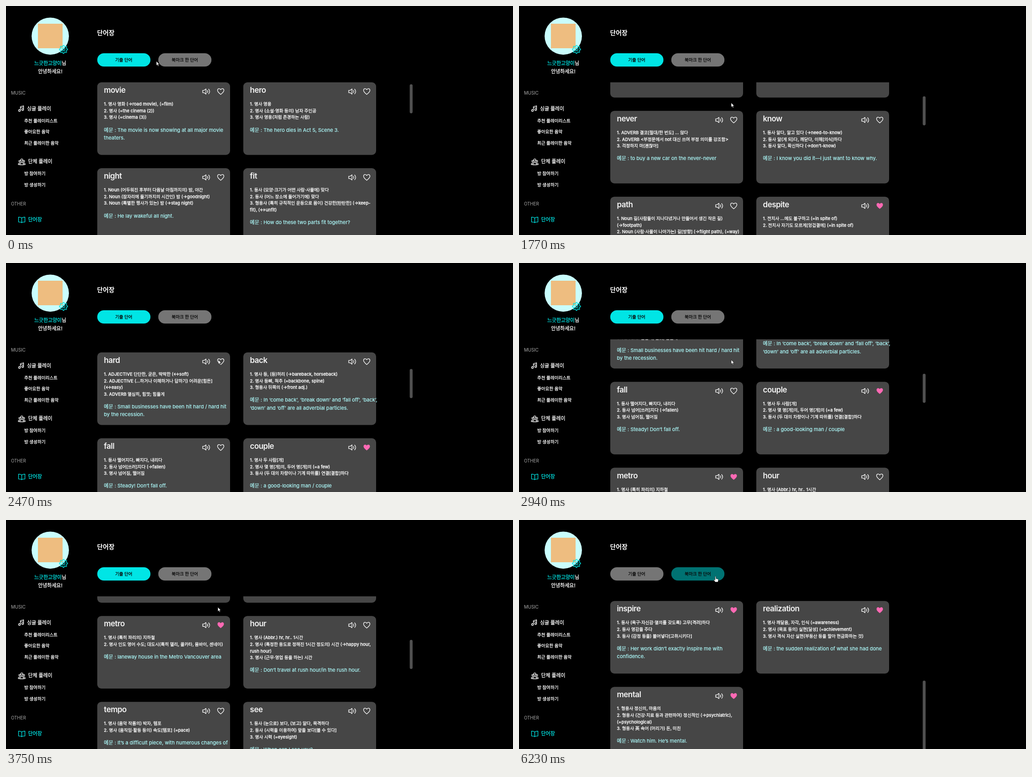
Recreate the animation shown at these times as an HTML page. Size 1111 by 504 pixels, loop 6.69 s.

```html
<!DOCTYPE html>
<html lang="ko">
<head>
<meta charset="utf-8">
<title>단어장</title>
<style>
html, body { margin: 0; width: 100%; height: 100%; overflow: hidden; background: #000; }
svg { display: block; width: 100%; height: 100%; }
/* The thin outline gives both scripts the same medium weight. */
text { font: 500 9.55px Inter, "Noto Sans CJK KR", sans-serif; fill: #fff; stroke: #fff; stroke-width: .28; }
.name { font-size: 10.9px; }
.section { font-size: 9.7px; font-weight: 400; fill: #a9a9a9; stroke: none; }
.heading { font-size: 13.8px; font-weight: 700; stroke: none; }
.word { font-size: 17px; font-weight: 600; letter-spacing: -.55px; fill: #f4f4f4; stroke: none; }
.example { font-size: 11px; font-weight: 400; fill: #b0ffff; stroke: #b0ffff; stroke-width: .2; }
.tab { fill: #0a0a0a; stroke: #0a0a0a; text-anchor: middle; }
.line { fill: none; stroke: #fff; stroke-width: 1.3; stroke-linecap: round; stroke-linejoin: round; }
.cyan { fill: #00e5e5; stroke: #00e5e5; }
.line.cyan { fill: none; }
</style>
</head>
<body>
<svg viewBox="0 0 1111 504">
  <defs>
    <clipPath id="view"><rect x="200" y="168" width="700" height="336"/></clipPath>
    <path id="heart" d="M0 6.5C-3 4-7 1-7-2.4C-7-4.9-5.4-6.3-3.6-6.3C-2-6.3-.7-5.4 0-4C.7-5.4 2-6.3 3.6-6.3C5.4-6.3 7-4.9 7-2.4C7 1 3 4 0 6.5Z"/>
    <path id="speaker" d="M-8-2.6H-4.8L-.8-5.8V5.8L-4.8 2.6H-8ZM2.2-2.6Q4.2 0 2.2 2.6M5-5.2Q9.6 0 5 5.2"/>
  </defs>

  <circle cx="97" cy="66.3" r="40.9" fill="#c9fdfd"/>
  <rect x="70" y="39" width="54" height="54" fill="#eebd80"/>
  <path id="gear" class="line cyan"/>
  <circle class="line cyan" cx="126" cy="95.5" r="3"/>

  <g class="line">
    <path d="M31.5 230V221.5L38.5 219.5V228M31.5 224L38.5 222"/>
    <circle cx="29.5" cy="230" r="2"/><circle cx="36.5" cy="228" r="2"/>
    <circle cx="34.5" cy="339" r="2.4"/><circle cx="29.8" cy="341.5" r="1.7"/><circle cx="39.2" cy="341.5" r="1.7"/>
    <path d="M30.5 349.5Q30.5 344 34.5 344T38.5 349.5ZM30 345.3Q27 345.5 27 349H30M39 345.3Q42 345.5 42 349H39"/>
  </g>
  <path class="line cyan" d="M34.5 467Q33 464.7 27.5 464.7V475.3Q33 475.3 34.5 477Q36 475.3 41.5 475.3V464.7Q36 464.7 34.5 467V477"/>

  <text class="name" x="97" y="129.8" text-anchor="middle"><tspan class="cyan">느긋한고양이</tspan>님</text>
  <text class="name" x="97" y="147.6" text-anchor="middle">안녕하세요!</text>
  <text class="section" x="11" y="194.7">MUSIC</text>
  <text class="name" x="46" y="230">싱글 플레이</text>
  <text x="40" y="255.5">추천 플레이리스트</text>
  <text x="40" y="280.2">좋아요한 음악</text>
  <text x="40" y="305">최근 플레이한 음악</text>
  <text class="name" x="48.6" y="346.4">단체 플레이</text>
  <text x="40" y="372.1">방 참여하기</text>
  <text x="40" y="396.8">방 생성하기</text>
  <text class="section" x="11" y="439.4">OTHER</text>
  <text class="name cyan" x="48.6" y="474.4">단어장</text>

  <text class="heading" x="199.6" y="64">단어장</text>
  <rect id="tabAll" x="200" y="104" width="116.5" height="29.3" rx="14.65"/>
  <rect id="tabMarked" x="333.7" y="104" width="116.5" height="29.3" rx="14.65"/>
  <text class="tab" x="258" y="122">기출 단어</text>
  <text class="tab" x="392" y="122">북마크 한 단어</text>

  <g clip-path="url(#view)"><g id="all"></g><g id="marked"></g></g>
  <rect id="thumb" x="884.7" width="6.3" rx="3.1" fill="#505050"/>

  <circle id="click" cx="425.3" cy="118.7" r="9" fill="#ff0" opacity=".55"/>
  <g id="cursor" fill="#fff" stroke="#000" stroke-width=".6">
    <path id="arrow" d="M0 0V9.4L2.2 7.4L3.7 10.9L5.2 10.2L3.7 6.9H6.6Z"/>
    <path id="hand" d="M-1 .8Q0-.8 1 .8V5L5.2 6Q6.4 6.4 6.2 7.8L5.4 12.5H-.6L-3.8 8.2Q-4 6.6-2.6 7L-1 8.4Z"/>
  </g>
</svg>

<script>
const LOOP = 6690, PITCH = 189, TOP = 168, NOTCH = 181.8;
const $ = id => document.getElementById(id);

// [word, definition lines, example lines, bookmarked]
const allWords = [
  ['movie', ['1. 명사 영화 (→road movie), (=film)', '2. 명사 (=the cinema (2))', '3. 명사 (=cinema (3))'],
    ['The movie is now showing at all major movie', 'theaters.']],
  ['hero', ['1. 명사 영웅', '2. 명사 (소설·영화 등의) 남자 주인공', '3. 명사 영웅(처럼 존경하는 사람)'],
    ['The hero dies in Act 5, Scene 3.']],
  ['night', ['1. Noun (어두워진 후부터 다음날 아침까지의) 밤, 야간', '2. Noun (잠자리에 들기까지의 시간인) 밤 (→goodnight)', '3. Noun (특별한 행사가 있는) 밤 (→stag night)'],
    ['He lay wakeful all night.']],
  ['fit', ['1. 동사 (모양·크기가 어떤 사람·사물에) 맞다', '2. 동사 (어느 장소에 들어가기에) 맞다', '3. 형용사 (특히 규칙적인 운동으로 몸이) 건강한[탄탄한] (→keep-', 'fit), (↔unfit)'],
    ['How do these two parts fit together?']],
  ['never', ['1. ADVERB 결코[절대/한 번도] ... 않다', '2. ADVERB &lt;부정문에서 not 대신 쓰여 부정 의미를 강조함&gt;', '3. 걱정하지 마[괜찮아]'],
    ['to buy a new car on the never-never']],
  ['know', ['1. 동사 알다, 알고 있다 (→need-to-know)', '2. 동사 알(게 되)다, 깨닫다, 이해[의식]하다', '3. 동사 알다, 확신하다 (→don’t-know)'],
    ['I know you did it—I just want to know why.']],
  ['path', ['1. Noun 길(사람들이 지나다녔거나 만들어서 생긴 작은 길)', '(→footpath)', '2. Noun (사람·사물이 나아가는) 길[방향] (→flight path), (=way)', '3. Noun (행동) 계획, 길'],
    ['a concrete path']],
  ['despite', ['1. 전치사 …에도 불구하고 (=in spite of)', '2. 전치사 자기도 모르게[엉겁결에] (=in spite of)'],
    ['Her voice was shaky despite all her efforts', 'to control it.'], true],
  ['hard', ['1. ADJECTIVE 단단한, 굳은, 딱딱한 (↔soft)', '2. ADJECTIVE (…하거나 이해하거나 답하기) 어려운[힘든]', '(↔easy)', '3. ADVERB 열심히, 힘껏; 힘들게'],
    ['Small businesses have been hit hard / hard hit', 'by the recession.']],
  ['back', ['1. 명사 등, (등)허리 (→bareback, horseback)', '2. 명사 등뼈, 척추 (=backbone, spine)', '3. 형용사 뒤쪽의 (→front adj.)'],
    ['In ‘come back’, ‘break down’ and ‘fall off’, ‘back’,', '‘down’ and ‘off’ are all adverbial particles.']],
  ['fall', ['1. 동사 떨어지다, 빠지다, 내리다', '2. 동사 넘어[쓰러]지다 (→fallen)', '3. 명사 넘어짐, 떨어짐'],
    ['Steady! Don’t fall off.']],
  ['couple', ['1. 명사 두 사람[개]', '2. 명사 몇 명[개]의, 두어 명[개]의 (=a few)', '3. 동사 (두 대의 차량이나 기계 따위를) 연결[결합]하다'],
    ['a good-looking man / couple'], true],
  ['metro', ['1. 명사 (특히 파리의) 지하철', '2. 명사 인도 영어 수도; 대도시(특히 델리, 콜카타, 뭄바이, 센네이)'],
    ['laneway house in the Metro Vancouver area'], true],
  ['hour', ['1. 명사 (Abbr.) hr, hr.. 1시간', '2. 명사 (특정한 용도로 정해진 1시간 정도의) 시간 (→happy hour,', 'rush hour)', '3. 명사 (근무·영업 등을 하는) 시간'],
    ['Don’t travel at rush hour/in the rush hour.']],
  ['tempo', ['1. 명사 (음악 작품의) 박자, 템포', '2. 명사 (움직임·활동 등의) 속도[템포] (=pace)'],
    ['It’s a difficult piece, with numerous changes of', 'tempo.']],
  ['see', ['1. 동사 (눈으로) 보다, (보고) 알다, 목격하다', '2. 동사 (시력을 이용하여) 앞을 보다[볼 수 있다]', '3. 명사 시력 (=eyesight)'],
    ['When can I see you?']]
];
const markedWords = [
  ['inspire', ['1. 동사 (욕구·자신감·열의를 갖도록) 고무[격려]하다', '2. 동사 영감을 주다', '3. 동사 (감정 등을) 불어넣다[고취시키다]'],
    ['Her work didn’t exactly inspire me with', 'confidence.'], true],
  ['realization', ['1. 명사 깨달음, 자각, 인식 (=awareness)', '2. 명사 (목표 등의) 실현[달성] (=achievement)', '3. 명사 격식 자산 실현(부동산 등을 팔아 현금화하는 것)'],
    ['the sudden realization of what she had done'], true],
  ['mental', ['1. 형용사 정신의, 마음의', '2. 형용사 (건강·치료 등과 관련하여) 정신적인 (→psychiatric),', '(=psychological)', '3. 형용사 英 속어 (머리가) 돈, 미친'],
    ['Watch him. He’s mental.'], true]
];

function card([word, definitions, example, bookmarked], i) {
  const text = (cls, y, s) => `<text class="${cls}" x="14.6" y="${y}">${s}</text>`;
  const exampleY = 51.2 + (definitions.length - 1) * 14.6 + 28.2;
  return `<g transform="translate(${200 + i % 2 * 320} ${(i >> 1) * PITCH})">
    <rect width="291" height="159.7" rx="9" fill="#464646"/>
    ${text('word', 23, word)}
    ${definitions.map((s, n) => text('', 51.2 + n * 14.6, s)).join('')}
    ${example.map((s, n) => text('example', exampleY + n * 17.5, n ? s : '예문 : ' + s)).join('')}
    <use href="#speaker" class="line" x="239" y="20.2"/>
    <use href="#heart" x="270.5" y="20.2" ${bookmarked ? 'fill="#ff69b4"' : 'class="line"'}/>
  </g>`;
}

function gearPath(cx, cy) {
  const teeth = 8, points = [];
  for (let i = 0; i < teeth; i++)
    for (const [offset, r] of [[-.3, 6.6], [-.18, 9], [.18, 9], [.3, 6.6]]) {
      const a = (i + offset) / teeth * 2 * Math.PI;
      points.push(`${cx + r * Math.cos(a)} ${cy + r * Math.sin(a)}`);
    }
  return `M${points.join('L')}Z`;
}

$('gear').setAttribute('d', gearPath(126, 95.5));
$('all').innerHTML = allWords.map(card).join('');
$('marked').innerHTML = markedWords.map(card).join('');
$('marked').setAttribute('transform', 'translate(0 178.2)');

const tickStarts = [0, 610, 1220, 1630, 1700, 2190, 2730, 2800, 3270, 3340, 3680, 4030, 4970, 5170, 6160];
function snap(t) {
  const start = tickStarts.findLast(s => s <= t);
  return start + Math.floor((t - start) / 70) * 70;
}

// [start, duration, notches]
const wheelTurns = [[1169, 212, 1], [1633, 207, 1], [2130, 325, 2], [2740, 320, 1], [3279, 212, 1]];
const smooth = u => (u = Math.min(1, Math.max(0, u)), u * u * (3 - 2 * u));
const scrollAt = t => wheelTurns.reduce((sum, [start, length, n]) => sum + n * NOTCH * smooth((t - start) / length), 0);

// [time, x, y]
const cursorPath = [[0, 329.5, 121.5], [350, 374, 135], [540, 374, 135], [1030, 465, 213], [3610, 465, 213],
  [3960, 463, 160], [4310, 425.5, 118], [6090, 425.5, 118], [6230, 430.7, 124], [LOOP, 430.7, 124]];
function cursorAt(t) {
  const i = cursorPath.findIndex(p => p[0] > t);
  const [t0, x0, y0] = cursorPath[i - 1], [t1, x1, y1] = cursorPath[i];
  const u = (t - t0) / (t1 - t0);
  return [x0 + (x1 - x0) * u, y0 + (y1 - y0) * u];
}

const show = (id, on) => $(id).setAttribute('visibility', on ? 'visible' : 'hidden');

function draw(time) {
  const t = snap(time % LOOP);
  const scroll = scrollAt(t), [x, y] = cursorAt(t);
  const hover = x > 334 && x < 450 && y > 104 && y < 133;
  const marked = t >= 5040;

  $('all').setAttribute('transform', `translate(0 ${TOP - scroll})`);
  show('all', !marked);
  show('marked', marked);
  $('thumb').setAttribute('y', marked ? 353.5 : 172.2 + scroll * .084);
  $('thumb').setAttribute('height', marked ? 300 : 64);

  $('tabAll').setAttribute('fill', marked ? '#757575' : '#00e5e5');
  $('tabMarked').setAttribute('fill', marked ? '#007272' : hover ? '#3b3b3b' : '#757575');

  $('cursor').setAttribute('transform', `translate(${x} ${y})`);
  show('arrow', !hover);
  show('hand', hover);
  show('click', t >= 4970 && t < 5170);
}

function frame() {
  draw(performance.now());
  requestAnimationFrame(frame);
}
frame();
</script>
</body>
</html>
```
